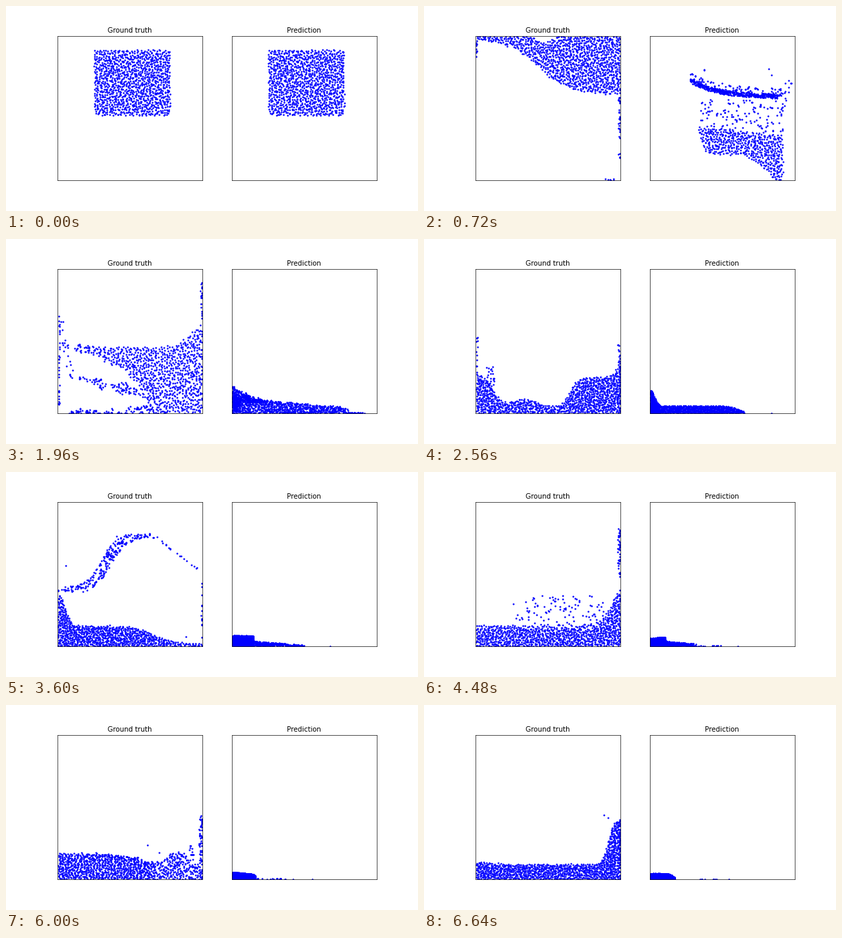
Recreate the animation shown at these times as a matplotlib script. Size 600 by 300 pixels, loop 6.68 s.

```python
import numpy as np
import matplotlib.pyplot as plt
from matplotlib.animation import FuncAnimation

FRAMES, STEP = 167, 40
COLS, ROWS = 40, 30
N = COLS * ROWS
SIDE = 211.36                   # edge of each square panel


def rise(x, c, w):
    return 1 / (1 + np.exp((c - x) / w))


def drop(x, c, w):
    return rise(-x, -c, w)


def bump(x, c, w):
    return np.exp(-((x - c) / w) ** 2)


def ease_in(x, c):
    return np.maximum(x - c, 0) ** 2


class Band:
    """Region from x0 to x1 between two heights, each a number or f(x)."""

    def __init__(self, x0, x1, lo, hi, n=None):
        self.x0, self.x1, self.lo, self.hi, self.n = x0, x1, lo, hi, n

    def heights(self, x):
        lo, hi = (f(x) if callable(f) else np.full_like(x, f)
                  for f in (self.lo, self.hi))
        return lo, np.maximum(hi, lo + 0.5)

    def scatter(self, rng, n):
        grid = np.linspace(self.x0, self.x1, 300)
        lo, hi = self.heights(grid)
        cdf = np.cumsum(hi - lo)
        x = np.interp(rng.random(n), cdf / cdf[-1], grid)
        lo, hi = self.heights(x)
        return np.column_stack([x, lo + (hi - lo) * rng.random(n)])

    def pack(self, rng, n, jitter=0.3):
        """Jittered hexagonal packing."""
        lo, hi = self.heights(np.linspace(self.x0, self.x1, 300))
        gap = np.sqrt((hi - lo).mean() * (self.x1 - self.x0) / n)
        xs = np.arange(self.x0 + gap / 2, self.x1, gap)
        pts = []
        for i, (x, a, b) in enumerate(zip(xs, *self.heights(xs))):
            first = b - gap * (0.25 + 0.5 * (i % 2))
            pts += [(x, y) for y in np.arange(first, a, -gap)]
        pts = np.array(pts) + rng.normal(0, jitter * gap, (len(pts), 2))
        if len(pts) < n:
            return np.vstack([pts, self.scatter(rng, n - len(pts))])
        return pts[rng.permutation(len(pts))[:n]]


class Cloud:
    """Particles that flow smoothly from pose to pose."""

    def __init__(self):
        self.rng = np.random.default_rng(4)
        self.times, self.keys = [], []

    def pose(self, t, body, *spray):
        rest = N - sum(b.n for b in spray)
        pts = np.vstack([body.pack(self.rng, rest)]
                        + [b.scatter(self.rng, b.n) for b in spray])
        # Sort by column, then by height, so poses pair up.
        cols = pts[np.argsort(pts[:, 0])].reshape(COLS, ROWS, 2)
        rank = np.argsort(cols[..., 1], axis=1)[..., None]
        cols = np.take_along_axis(cols, rank, axis=1)
        self.times.append(float(t))
        self.keys.append(self.clip(cols.reshape(N, 2)))

    @staticmethod
    def clip(pts):
        return np.clip(pts, [1, 0], SIDE - 1)

    def finish(self):
        self.times, self.keys = np.array(self.times), np.array(self.keys)
        self.slope = np.gradient(self.keys, self.times, axis=0)

    def at(self, t):
        T, K, V = self.times, self.keys, self.slope
        k = min(np.searchsorted(T, t, side="right") - 1, len(T) - 2)
        d = T[k + 1] - T[k]
        s = (t - T[k]) / d
        ease = s * s * (3 - 2 * s)
        return self.clip((1 - ease) * K[k] + ease * K[k + 1]
                         + d * s * (1 - s) * ((1 - s) * V[k] - s * V[k + 1]))


truth, guess = Cloud(), Cloud()

# Both blocks are thrown towards the upper right corner.
for cloud in (truth, guess):
    cloud.pose(0, Band(53.5, 164.5, 94.5, 190.5))
    cloud.pose(80, Band(72, 183, 114, 210))

# Splash on the ceiling
truth.pose(260, Band(43, 211, lambda x: 123 + 85 * drop(x, 85, 10), 211))
truth.pose(
    720, Band(1, 211, lambda x: 126 + 80 * drop(x, 92, 22),
              lambda x: 211 - 10 * bump(x, 101, 12)),
    Band(1, 3, 178, 205, 10), Band(208, 211, 17, 125, 30),
    Band(188, 202, 0, 2, 6))
# Fall along the right wall
truth.pose(
    1400, Band(13, 211, lambda x: 190 - 0.36 * x - 0.016 * ease_in(x, 128),
               lambda x: 194 - 0.27 * x + 22 * bump(x, 136, 8)
               + 65 * rise(x, 174, 7)),
    Band(1, 4, 60, 207, 28), Band(1, 14, 190, 211, 22),
    Band(50, 57, 182, 205, 8), Band(150, 210, 0, 4, 35),
    Band(1, 85, 0, 2, 18))
truth.pose(
    1750, Band(1, 211, lambda x: np.maximum(145 - 0.004 * x * x, 0),
               lambda x: 135 + 20 * drop(x, 35, 15) + 35 * rise(x, 190, 12)),
    Band(35, 180, 0, lambda x: 0.12 * x, 150),
    Band(1, 4, 25, 165, 25), Band(208, 211, 165, 197, 15))
truth.pose(
    2080, Band(1, 211, lambda x: np.maximum(70 - 0.004 * x * x, 0),
               lambda x: 75 + 12 * drop(x, 30, 15) + 45 * rise(x, 195, 12)),
    Band(1, 130, 0, 17, 220), Band(1, 4, 5, 135, 40),
    Band(208, 211, 125, 183, 18))
# Slosh to the left, with a jet off the left wall
truth.pose(
    2560, Band(1, 211, 0, lambda x: 8 + 48 * drop(x, 26, 6)
               + 13 * bump(x, 70, 30) + 45 * rise(x, 137, 6)
               + 25 * rise(x, 206, 4)),
    Band(1, 3, 55, 118, 13), Band(15, 29, 40, 70, 22),
    Band(207, 211, 63, 100, 16))
truth.pose(
    3300, Band(1, 211, 0, lambda x: 15 + 18 * drop(x, 180, 10)
               + 25 * drop(x, 12, 6)),
    Band(1, 77, lambda x: 67 + 75 * rise(x, 55, 12),
         lambda x: 97 + 62 * rise(x, 50, 12), 240),
    Band(75, 125, 148, 158, 20), Band(209, 211, 5, 90, 12))
truth.pose(
    3600, Band(1, 211, 0, lambda x: 4 + 26 * drop(x, 140, 14)
               + 49 * drop(x, 12, 4)),
    Band(1, 140, lambda x: 77 + 82 * rise(x, 77, 12),
         lambda x: 87 + 79 * rise(x, 64, 11), 240),
    Band(141, 206, lambda x: 270 - 0.78 * x, lambda x: 273 - 0.78 * x, 17),
    Band(209, 211, 5, 98, 13), Band(12, 13, 118, 119, 1),
    Band(85, 86, 161, 162, 1), Band(186, 187, 13, 14, 1))
truth.pose(
    4050, Band(1, 211, 0, 32),
    Band(1, 211, lambda x: 45 + 80 * bump(x, 115, 60),
         lambda x: 65 + 88 * bump(x, 115, 60), 220),
    Band(208, 211, 45, 171, 28))
# Back against the right wall
truth.pose(
    4500, Band(1, 211, 0, lambda x: 29 + 70 * rise(x, 200, 8)),
    Band(55, 187, 33, 72, 90), Band(207, 211, 100, 177, 40))
truth.pose(
    5400, Band(1, 211, 0, lambda x: 10 + 34 * drop(x, 102, 7)
               + 6 * bump(x, 52, 25) + 10 * bump(x, 160, 20)),
    Band(186, 194, 20, 33, 12), Band(205, 211, 10, 108, 52))
truth.pose(
    6640, Band(1, 211, 0, lambda x: 22 + 5 * drop(x, 15, 8)
               + 66 * rise(x, 193, 4)),
    Band(187, 188, 94, 95, 1), Band(193, 194, 89, 90, 1))


def crust(x):
    return 122 + 24 * np.exp((59 - x) / 40)


def arm(x):
    return 20 + 34 * drop(x, 66, 13)


# The top layer packs into a crust, then everything drops.
guess.pose(260, Band(73, 196, 100, 197), Band(69, 204, 200, 211, 420),
           Band(197, 210, 145, 205, 15))
guess.pose(
    720, Band(71, 194, lambda x: np.maximum(
        38 + 30 * bump(x, 70, 8) - 0.012 * ease_in(x, 125), 0),
        lambda x: 85 - 0.1 * x),
    Band(59, 187, lambda x: crust(x) - 3, lambda x: crust(x) + 3, 420),
    Band(59, 200, crust, lambda x: crust(x) + 12, 110),
    Band(74, 197, 70, 118, 130), Band(166, 208, 110, 167, 12),
    Band(78, 81, 160, 164, 2))
guess.pose(
    1400, Band(6, 211, 0, lambda x: 5 + 23 * bump(x, 75, 65)),
    Band(1, 121, lambda x: arm(x) - 6, lambda x: arm(x) + 6, 400),
    Band(51, 84, 0, 21, 220),
    Band(1, 95, arm, lambda x: arm(x) + 20, 65),
    Band(200, 211, 4, 38, 24))
# Collapse into the lower left corner
guess.pose(1750, Band(1, 204, 0, lambda x: 34 - 0.15 * x),
           Band(1, 60, 18, lambda x: 48 - 0.4 * x, 300))
guess.pose(2560, Band(1, 138, 0, lambda x: 11 * drop(x, 130, 7)),
           Band(1, 15, 0, lambda x: 10 + 28 * drop(x, 7, 3), 460))
guess.pose(3600, Band(1, 32, 0, 15.5),
           Band(31, 106, 0, lambda x: 10.5 - 0.085 * x, 300))
guess.pose(5400, Band(1, 37, 0, lambda x: 12 - 0.14 * x),
           Band(37, 100, 0, 1, 20))
guess.pose(6640, Band(1, 37, 0, lambda x: 8.5 * drop(x, 34, 3)),
           Band(73, 82, 0, 0.5, 4), Band(92, 101, 0, 0.5, 4))
truth.finish()
guess.finish()


def stray(t):
    """The lone drop sliding left along the floor."""
    x = 112 + 97 * np.exp((2000 - t) / 1400)
    return np.array([[x, 0.4]] if t >= 2000 else []).reshape(-1, 2)


fig, axes = plt.subplots(1, 2, figsize=(10, 5), dpi=60)
fig.subplots_adjust(left=0.125, right=0.9, bottom=0.125, top=0.88, wspace=0.2)
dots = []
for ax, title in zip(axes, ("Ground truth", "Prediction")):
    ax.set_title(title, fontsize=12, family="DejaVu Sans")
    ax.set(xlim=(0, SIDE), ylim=(0, SIDE), xticks=[], yticks=[])
    ax.set_aspect(1)
    dots += ax.plot([], [], "o", ms=2, color="blue")


def draw(i):
    t = i * STEP
    dots[0].set_data(*truth.at(t).T)
    dots[1].set_data(*np.vstack([guess.at(t), stray(t)]).T)
    return dots


anim = FuncAnimation(fig, draw, frames=FRAMES, interval=STEP, repeat=True,
                     repeat_delay=0)
plt.show()
```
